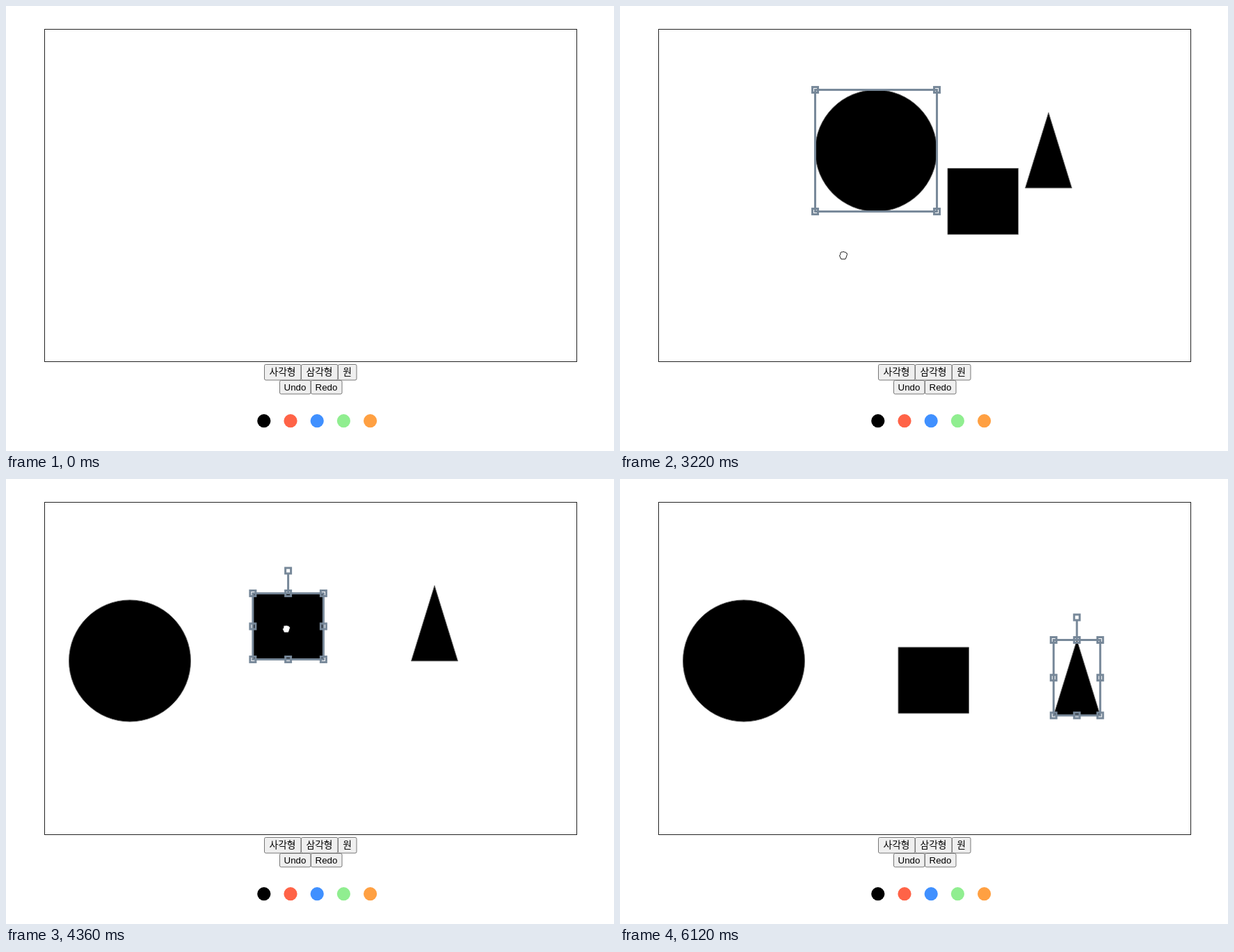
An HTML page with a canvas for the animation above (7040 ms loop, 874 by 640 pixels).

```html
<!DOCTYPE html>
<html lang="ko">
<head>
<meta charset="utf-8">
<style>
  html, body { margin: 0; height: 100%; overflow: hidden; background: #fff; }
  canvas { display: block; }
</style>
</head>
<body>
<canvas id="stage" width="874" height="640"></canvas>
<script>
const ctx = document.getElementById('stage').getContext('2d');
const LOOP = 7040, START = 200, TICK = 103.86;

const clamp = v => Math.max(0, Math.min(1, v));
const lerp = (a, b, u) => a.map((v, i) => v + (b[i] - v) * u);
const add = (a, b) => a.map((v, i) => v + b[i]);

const bezier = (a, b, c, d) => u => {
  const ab = lerp(a, b, u), bc = lerp(b, c, u), cd = lerp(c, d, u);
  return lerp(lerp(ab, bc, u), lerp(bc, cd, u), u);
};
const swing = (from, to) => u => {
  const wave = Math.sin(3 * Math.PI * u);
  return add(lerp(from, to, u), [35 * wave, 40 * Math.sin(Math.PI * u) - 35 * wave]);
};

// All spans are [first, last] in ticks; the cursor runs `lead` ticks ahead of its shape.
const shapes = [
  {
    size: [175, 175], grow: [22, 26], drag: [27, 35], grab: [154, 110], lead: 2, selected: [28, 36],
    path: bezier([330, 50], [345, 50], [-40, 538], [90.5, 174]),
    trace: (w, h) => ctx.ellipse(w / 2, h / 2, w / 2, h / 2, 0, 0, Math.PI * 2)
  },
  {
    size: [101.5, 95], grow: [7, 9], drag: [37, 42], grab: [48, 51], lead: 0, selected: [37, 45], rotates: true,
    path: bezier([471, 233.5], [331, 135], [331, 135], [400, 242]),
    trace: (w, h) => ctx.rect(0, 0, w, h)
  },
  {
    size: [67, 108.5], grow: [14, 17], drag: [46, 57], grab: [34, 82], lead: 0, selected: [46, 99], rotates: true,
    path: swing([582.5, 153.3], [623.3, 231.5]),
    trace: (w, h) => { ctx.moveTo(w / 2, 0); ctx.lineTo(w, h); ctx.lineTo(0, h); ctx.closePath(); }
  }
];

// Cursor trips between the drags.
const trips = [
  { span: [0, 7], travel: 4, from: [578, 592], to: [402, 523], press: 7 },
  { span: [10, 12], travel: 1, from: [440, 522], to: [440, 522], press: 11 },
  { span: [18, 20], travel: 1, from: [489, 526], to: [489, 526], press: 20 },
  { span: [35, 36], travel: 2, from: [270, 295], to: [519, 285], icon: 'hand' },
  { span: [42, 45], travel: 2, from: [448, 293], to: [647, 241] }
];

const icons = {
  arrow: new Path2D('M0 0V14L3.2 11L5.5 16.2L7.6 15.2L5.4 10.2H9.5Z'),
  hand: new Path2D('M-3 6L-6 0Q-6.5-2-4.5-1.5L-3.5 0L-4-4Q-3.5-6-2-4.5L-1.5-2V-5.5Q-.5-7.5 .5-5.5V-2L1.5-5.5Q3-6.5 3.2-4.5L3-1.5L4-3.5Q6-4 5.7-2L4 4L3.5 6Z'),
  fist: new Path2D('M-3 5.5L-5 1.5Q-6-.5-4-1V-3.5Q-3-5.5-1.5-4.5Q0-6 1.5-4.5Q3.2-5.2 3.8-3.5Q6-3.5 5.5-1L4 3.5L3 5.5Z')
};

const within = (tick, [first, last]) => tick >= first && tick <= last;
const progress = (tick, [first, last]) => clamp((tick - first) / (last - first));

function findCursor(tick) {
  const trip = trips.find(item => within(tick, item.span));
  if (trip) {
    const pos = lerp(trip.from, trip.to, clamp((tick - trip.span[0]) / trip.travel));
    return { pos, icon: trip.icon || 'arrow', pressed: tick >= trip.press };
  }
  const shape = shapes.find(({ drag }) => tick >= drag[0] && tick < drag[1]);
  if (!shape) return null;
  const pos = shape.path(progress(tick + shape.lead, shape.drag));
  return { pos: add(pos, shape.grab), icon: 'fist' };
}

function drawButton(label, x, y, w, h, font, cursor) {
  const hover = cursor && within(cursor.pos[0], [x, x + w]) && within(cursor.pos[1], [y, y + h]);
  const active = hover && cursor.pressed;
  ctx.fillStyle = active ? '#f5f5f5' : hover ? '#e5e5e5' : '#efefef';
  ctx.strokeStyle = active ? '#8d8d8d' : hover ? '#4f4f4f' : '#767676';
  ctx.beginPath();
  ctx.roundRect(x + 0.5, y + 0.5, w - 0.5, h - 0.5, 2);
  ctx.fill();
  ctx.stroke();
  ctx.fillStyle = '#000';
  ctx.font = font;
  ctx.fillText(label, x + w / 2, y + h / 2 + 4.7);
}

function drawRow(labels, widths, y, h, font, cursor) {
  let x = Math.round(437.5 - widths.reduce((sum, w) => sum + w) / 2);
  labels.forEach((label, i) => {
    drawButton(label, x, y, widths[i], h, font, cursor);
    x += widths[i];
  });
}

function drawPage(cursor) {
  ctx.fillStyle = '#fff';
  ctx.fillRect(0, 0, 874, 640);
  ctx.lineWidth = 1;
  ctx.strokeStyle = '#222';
  ctx.strokeRect(55.5, 33.5, 765, 478);
  ctx.textAlign = 'center';
  drawRow(['사각형', '삼각형', '원'], [53, 53, 27], 515, 23,
    '300 13.8px "Noto Sans CJK KR", "Noto Sans CJK", sans-serif', cursor);
  drawRow(['Undo', 'Redo'], [45, 45], 538, 20, '13.33px "Liberation Sans", sans-serif', cursor);
  ['#000', '#ff6347', '#4090ff', '#90ee90', '#ffa042'].forEach((color, i) => {
    ctx.fillStyle = color;
    ctx.beginPath();
    ctx.arc(370.8 + i * 38.2, 596.7, 9.6, 0, Math.PI * 2);
    ctx.fill();
  });
}

function drawControls([w, h], rotates) {
  ctx.strokeStyle = '#778899';
  ctx.lineWidth = 3;
  ctx.strokeRect(0, 0, w, h);
  const handle = (x, y) => ctx.strokeRect(x - 4, y - 4, 8, 8);
  for (const u of [0, 0.5, 1])
    for (const v of [0, 0.5, 1]) {
      const corner = u !== 0.5 && v !== 0.5;
      if (corner || (rotates && u !== v)) handle(u * w, v * h);
    }
  if (!rotates) return;
  ctx.beginPath();
  ctx.moveTo(w / 2, 0);
  ctx.lineTo(w / 2, -28);
  ctx.stroke();
  handle(w / 2, -32.5);
}

function drawShape({ size, grow, drag, path, trace, selected, rotates }, tick) {
  const scale = progress(tick, grow);
  if (!scale) return;
  ctx.save();
  ctx.translate(...path(progress(tick, drag)));
  ctx.beginPath();
  trace(size[0] * scale, size[1] * scale);
  ctx.fillStyle = '#000';
  ctx.strokeStyle = '#666';
  ctx.lineWidth = 0.9;
  ctx.fill();
  ctx.stroke();
  if (within(tick, selected)) drawControls(size, rotates);
  ctx.restore();
}

function drawCursor({ pos, icon }) {
  ctx.save();
  ctx.translate(...pos);
  ctx.fillStyle = '#fff';
  ctx.strokeStyle = '#000';
  ctx.lineWidth = 0.9;
  ctx.lineJoin = 'round';
  ctx.fill(icons[icon]);
  ctx.stroke(icons[icon]);
  ctx.restore();
}

function render() {
  const time = performance.now() % LOOP;
  const tick = Math.floor((time - START) / TICK + 0.15);
  const cursor = findCursor(tick);
  drawPage(cursor);
  ctx.save();
  ctx.beginPath();
  ctx.rect(56, 34, 764, 477);
  ctx.clip();
  shapes.forEach(shape => drawShape(shape, tick));
  ctx.restore();
  if (cursor) drawCursor(cursor);
  requestAnimationFrame(render);
}
render();
</script>
</body>
</html>
```
